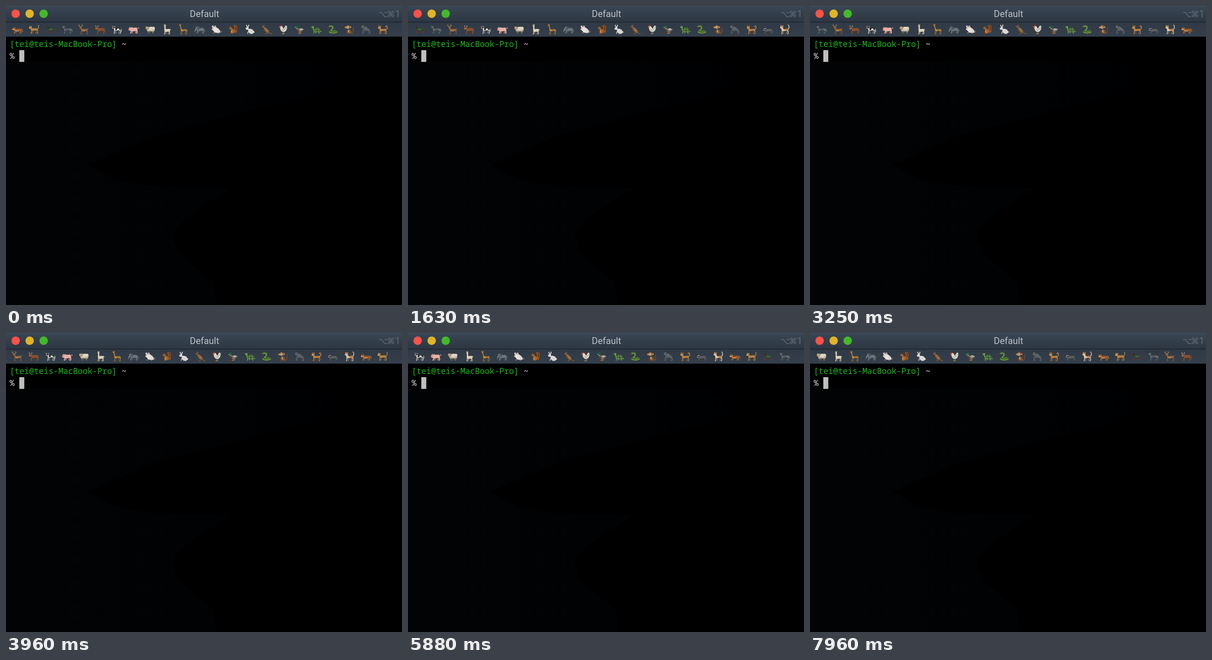
These frames come from a looping animation (862x650 px, 8000 ms). An HTML page:

```html
<!DOCTYPE html>
<html lang="en">
<head>
<meta charset="utf-8">
<title>Terminal</title>
<style>
html, body { margin: 0; width: 100%; height: 100%; overflow: hidden; background: #000; }
svg { display: block; width: 862px; height: 650px; }
.mono { font: 17.67px "Noto Sans Mono", "DejaVu Sans Mono", monospace; white-space: pre; }
.title { font: 20px Roboto, sans-serif; fill: #b9c0c8; text-anchor: middle; }
.key { font: 18px "DejaVu Sans", sans-serif; fill: #626c78; text-anchor: middle; }
#zoo { stroke-linecap: round; stroke-linejoin: round; }
</style>
</head>
<body>
<svg viewBox="0 0 862 650">
  <defs>
    <linearGradient id="head" x2="0" y2="1"><stop stop-color="#3a4654"/><stop offset="1" stop-color="#2d3742"/></linearGradient>
    <linearGradient id="bar" x2="0" y2="1"><stop stop-color="#303a46"/><stop offset="1" stop-color="#343f4b"/></linearGradient>
    <linearGradient id="dusk" x2="1" y2="0"><stop stop-color="#010304"/><stop offset=".6" stop-color="#000204"/><stop offset="1" stop-color="#000001"/></linearGradient>
  </defs>
  <rect width="862" height="650"/>
  <path fill="url(#dusk)" d="M0 120H770L690 192L600 210L330 280L180 345L240 378L330 392L490 396Q440 428 400 455Q368 478 362 505L380 540L450 600L460 650H0Z"/>
  <rect width="862" height="35" fill="url(#head)"/>
  <rect width="862" height="1" fill="#435164"/>
  <rect y="34" width="862" height="1.4" fill="#1f2730"/>
  <rect y="35.4" width="862" height="31.2" fill="url(#bar)"/>
  <circle cx="21" cy="16.7" r="9.2" fill="#ff5147"/>
  <circle cx="51.5" cy="16.7" r="9.2" fill="#e0b424"/>
  <circle cx="82" cy="16.7" r="9.2" fill="#43b929"/>
  <text class="title" x="432" y="24">Default</text>
  <text class="key" x="821" y="23.5">⌥</text>
  <text class="key" x="838" y="23.5">⌘</text>
  <text class="key" x="852.5" y="24" style="font:20px Roboto,sans-serif">1</text>
  <g id="zoo"></g>
  <text class="mono" x="8" y="89" fill="#14bd14">[tei@teis-MacBook-Pro] <tspan fill="#e2e2e2">~</tspan></text>
  <text class="mono" x="8" y="115" fill="#dcdcdc">%</text>
  <rect x="29" y="96" width="10.8" height="25.5" fill="#bfbfbf"/>
</svg>
<script>
const line = (d, c, w = 1) => `<path d="${d}" fill="none" stroke="${c}" stroke-width="${w}"/>`;
const shape = (d, c) => `<path d="${d}" fill="${c}"/>`;
const oval = (x, y, rx, ry, c) => `<ellipse cx="${x}" cy="${y}" rx="${rx}" ry="${ry}" fill="${c}"/>`;
const eye = (x, y) => oval(x, y, .5, .6, '#15110f');
const narrow = (art, k) => `<g transform="scale(${k} 1)">${art}</g>`;

// Four-legged body facing left; the options set its build.
function beast(c, o = {}) {
  const { far = c, x = -7.5, y = -2.5, r = 2.5, fat = 5.5, top = 0, w = 1.5, foot = 8.5, neck = 3,
          tail = 'M8 -1q3 0 3 5', tw = 1.2, ears = 1 } = o;
  const up = top - fat / 2, low = top + fat / 2;
  return line(tail, c, tw) +
    line(`M-3 ${low - 1}L-2.2 ${foot - .8}h-.8M5.5 ${low - 1}L4.6 ${foot - .8}h-.8`, far, w) +
    shape(`M-6 ${up}Q0 ${up + 1} 5.5 ${up}Q9.5 ${up + .6} 8.6 ${low}Q6 ${low} 4 ${low - 1}Q0 ${low + .4} -4 ${low}Q-7 ${low - 1} -6 ${up}Z`, c) +
    line(`M-5 ${low - 1.5}L-5.6 ${foot}h-.8M7.4 ${low - 1.5}L8.3 ${(low + foot) / 2}L7.4 ${foot}h-.8`, c, w) +
    line(`M-4.5 ${top - .5}L${x + 1} ${y}`, c, neck) +
    oval(x, y, r + .5, r, c) +
    (ears ? line(`M${x - .8} ${y - r}l-.4 -.8M${x + 2} ${y - r + .3}l.7 -.9`, c, 1.3) : '') +
    eye(x - 1, y - .4);
}

const tiger = beast('#d0752f', { far: '#95491c', y: -1, top: 1, foot: 8, tail: 'M8 -1q3 0 3 3t1 2' }) +
  line('M-3 3.5H3', '#e6cba6', 1) + line('M-3 -1l.5 2.5M0 -1l.4 3M3 -1l.3 2.5M6 -1.5l.6 4M-8 -3.4v1', '#2c1a12', .9) +
  oval(-9.2, 0, 1.4, 1, '#eedcc2');

const leopard = beast('#cf9648', { far: '#8d6430', y: -4, tail: 'M8 -1q3 -2 2 -5t1 -3' }) +
  line('M-4 -1h.1M-2 1h.1M0 -1h.1M2 .8h.1M4 -1.2h.1M6 1h.1M7 -1h.1M-6 -3h.1M7.5 4h.1M-5 4h.1', '#4c2d16', 1.3) +
  oval(-9.2, -3, 1.3, .9, '#eed8b0');

const horse = beast('#4d3928', { far: '#33261d', x: -8, y: -4.5, r: 1.7, fat: 4.8, w: 1.1, neck: 2.6, foot: 8, tail: 'M8 -2q4 0 3 6', tw: 1.6 }) +
  line('M-4.5 -2.5L-6.5 -6', '#211b18', 1.2) + shape('M-3 -2H5L5.5 1.8H-3Z', '#256b39') +
  line('M-5.6 5v1.6M-2.4 5v1.4M4.8 5v1.4M7.8 5.6l-.2 1', '#a3302d', 1.2);

const zebra = beast('#85888a', { far: '#505457', x: -8, y: -4.5, r: 1.7, fat: 4.8, w: 1.1, neck: 2.6, foot: 8 }) +
  line('M-6.5 -4.5l1 3M-4 -2l.8 4M-1.5 -1.6l.4 3.6M1 -1.6v3.4M3.5 -2l-.4 4M6.3 -2l-.4 4M-6 5h1M7 5h1.4', '#25282c', 1.1) +
  oval(-9.6, -3.8, 1, .9, '#37393b');

const deer = beast('#9b6636', { far: '#684022', x: -7.2, y: -4, r: 1.9, fat: 4.8, top: 1, w: 1.1, foot: 10, neck: 2.6, tail: 'M8 -1l2 -1' }) +
  line('M-7 -6q-4 -1 -3 -5M-9.5 -8l-2 -.5M-6 -6q4 0 2 -5M-3.8 -8l2 -1', '#c2955f', .9) + oval(0, 3, 4, .7, '#c99e6c');

const ox = beast('#88502d', { far: '#5a321b', x: -7.5, y: -3, r: 2.7, fat: 7, w: 1.8, neck: 4.5, tail: 'M9 -2q2 2 1 7' }) +
  line('M-9 -5.5q-2 -1 -1 -3M-5.5 -5.5q2 -1 1 -3', '#dccaaa', 1) + oval(-9, -1.6, 1.6, 1.2, '#bd8e6e');

const cow = beast('#e3e1d9', { far: '#98948d', x: -7, y: -4, r: 2.1, fat: 5.2, w: 1.3, tail: 'M9 -2q2 2 1 7', tw: .9 }) +
  shape('M-3 -2.3H1L0 1Q-2 3 -4 0ZM4 -2.8H8.5V1Q6 2.5 4 -2.5ZM-9 -6L-5 -6V-2.4L-7.6 -2.4Z', '#282522') +
  oval(-8.6, -2.8, 1.3, 1, '#d9a59b') + line('M-5 -6l1.4 -1.6M-9 -6l-2 -1.6', '#8d8478', .9);

const pig = beast('#eab0a5', { far: '#bd7d74', x: -6.8, y: -.5, r: 3.4, fat: 8.5, w: 2, foot: 8, tail: 'M9 -2q3 1 1 -2q-2 1 2 1', tw: .9 }) +
  oval(-9.6, .6, 1.3, 1.6, '#d68c85') + line('M-7 -4l-1 -1M-4 -3.6l1.4 -1', '#d28b83', 1.2);

const sheep = line('M-4 4v4.5M-1 4v4M5 4v4M7 4v4.5', '#857357', 1.4) +
  [-4, -1, 2, 5, 7].map((x, i) => oval(x, i % 2 - 2, 3.5, 4, '#ded5c2') + oval(x, 1.6, 3, 3, '#bdb19a')).join('') +
  oval(2, -2, 6.5, 3.8, '#ded5c2') + oval(-7.3, -3.5, 2.6, 3, '#c3aa87') +
  line('M-6 -6q4 0 3 3t-3 1', '#83694c', 1.3) + eye(-8.2, -4);

const llama = narrow(beast('#ddd0b5', { far: '#a18e6f', x: -5.5, y: -8, r: 1.8, fat: 7, top: 2, w: 1.7, foot: 10, neck: 3.6, tail: 'M8 0l2 1', tw: 2 }) +
  line('M-5 -9l-.5 -1.6M-4 -9l.6 -1.6', '#c9b089', 1.1) + oval(-7.4, -7.3, 1.2, .8, '#9f815d'), .8);

const giraffe = narrow(beast('#c98f3c', { far: '#885822', x: -8.5, y: -9, r: 1.4, fat: 4.5, top: 1.5, w: 1.2, foot: 10.5, neck: 2.4, tail: 'M8 0q2 2 1 5', tw: .9 }) +
  line('M-6.5 -7h.1M-5.5 -4h.1M-4 -1h.1M0 1h.1M2 2h.1M4 .5h.1M6.5 2h.1M7.6 5h.1M-5 5h.1', '#66391a', 1.6), .88);

const elephant = beast('#6c757d', { far: '#454d55', x: -5.5, y: -3, r: 3.2, fat: 7.5, w: 2.3, foot: 7.6, ears: 0 }) +
  line('M-8 -3q-2 2 -2 4.5t-1.5 3.5', '#6c757d', 1.7) + oval(-3, -2.5, 2.2, 3.4, '#4e5760') + line('M-7.8 .6l-2 .6', '#e0d9c9', .9);

const mouse = line('M6 6q5 1 4.6 -1.6t-3.6 -1', '#c98d86', 1) +
  shape('M-8 -4Q-3 -8 2 -3Q8 0 8 6.6Q4 8.4 -4 6.6Q-6 4 -8 1.6Q-12.5 .5 -8 -4Z', '#e6e2dc') +
  line('M2 0Q6 3 3 6.4', '#b9b3ac', .8) +
  oval(-8, -6, 2, 2.4, '#eee9e3') + oval(-8, -5.8, 1.1, 1.5, '#d7958f') + oval(-3, -6, 2.2, 2.6, '#ddd6cf') +
  oval(-3, -5.8, 1.3, 1.7, '#d7958f') + line('M-5 7.6h-2M2 8h2.6', '#d3978f', 1.2) + eye(-7.8, -1.6) + oval(-10.2, .3, .7, .6, '#cf706d');

const squirrel = shape('M4 8Q10 8 8.6 1Q11.6 -9 5 -10Q0 -10 2 -5.6Q4 -3 2 3Z', '#94501d') +
  line('M5 -8Q8.5 -5 6 1', '#532911', 1.4) + shape('M-4 -2Q3 -2 3.4 4Q4.4 9 -4.6 9Q-5.4 4 -4 -2Z', '#a8652d') +
  oval(-5.5, -3, 3.1, 2.7, '#a8652d') + line('M-6 -5.6v-1.4M-3.6 -5l.8 -1.4', '#6c3816', 1.3) + oval(-3.4, 4, 1.1, 2.8, '#d9b788') +
  line('M-4 3l-3 .8M-5 9h-1.6', '#723c18', 1.3) + eye(-6.5, -3.4);

const rabbit = shape('M-4 -1Q4 -3 8 2Q10 6 7 9Q1 9 -2 7Z', '#dedbd6') + oval(9, 5.6, 1.5, 1.6, '#f5f3f0') +
  oval(-5.5, -2, 3.2, 2.6, '#e8e5e0') + line('M-5 -4.6L-7 -9M-3.6 -4.4L-2 -9.4', '#e6e3de', 2) +
  line('M-5.4 -5.6L-6.8 -8.6M-3.4 -5.4L-2.2 -8.8', '#cf9792', .8) + line('M-3 4l-1.6 4.6M1 9h5', '#c9c5c0', 1.7) +
  line('M2 6Q3 3 6 4', '#b3afaa', .8) + eye(-6.5, -2.4);

const kangaroo = line('M4 5Q7 9 11 9', '#845831', 1.8) + shape('M-6 -5Q0 -5 5.4 3Q7 7 2 7.4Q-4 3 -6 -5Z', '#9d6d3c') +
  line('M3 5l-3 2l1 2.5h-3.5M-2 0l-3.6 1.8', '#794f29', 1.5) + oval(-7, -6, 2.4, 1.7, '#9d6d3c') +
  line('M-6.2 -7.5l.2 -2.4M-5.2 -7l1.8 -2.2', '#845831', 1.3) + eye(-7.6, -6.4);

const rooster = narrow(shape('M2 -1Q5 -9 8 -8.6Q11 -7 9 -1Q8 4 3 5.4Q-4 6 -6.4 -2Q-7 -8 -4 -8.4Q-1 -7 2 -1Z', '#dcd7cb') +
  line('M5 0Q7 -6 9 -5M-2 0q3 4 6 0', '#98938a', 1.1) + line('M0 6v3.6h-1.6M3 6v3.6h-1.6', '#c98f37', 1.1) +
  shape('M-7.4 -7L-7.6 -9.6L-6 -8.6L-5 -10.6L-4 -8.6L-2.4 -9.6L-3 -7Z', '#c92b2b') + line('M-6.6 -4v2', '#c92b2b', 1.8) +
  shape('M-7 -6.6L-9.6 -5.2L-6.6 -4.6Z', '#dba83b') + eye(-5.4, -6.4), .95);

const duck = shape('M-5 -1Q2 -3 10.5 -3.4Q8 5 1 5Q-5 5 -6 1Z', '#7a7167') + shape('M-6 -1Q-2 -1 -1.4 4Q-5 4.6 -6 -1Z', '#5f3224') +
  shape('M-.5 -1Q5 -3 9 -1Q5 3 0 1Z', '#b9b2a7') + line('M6.6 -2.2l3.6 -1', '#212326', 1.6) + oval(-5.5, -5.2, 2.7, 3, '#166c40') +
  line('M-6.8 -1.8h3', '#e6e3db', 1) + shape('M-7.6 -6L-11 -4.4L-7.8 -3.4Z', '#d39d2e') + line('M0 5v3.4h-2.6M3 5v3.4H1', '#d67b2a', 1.2) + eye(-6.2, -5.9);

const turtle = line('M-4 5l-1 3.4M6 5l.8 3.4M-.4 5v2.6M10 4l1 1', '#5a9342', 2.1) + line('M-4.6 2.6L-6.8 -4', '#619d46', 2.4) +
  oval(-7.3, -5.3, 2.8, 2.3, '#67a34a') + shape('M-4.6 4Q-3.6 -4.4 3 -4.6Q9 -3.6 10 4.6Q2 6.4 -4.6 4Z', '#365c2d') +
  line('M0 -3.6L-1 3M5 -3.8L6 5M-3.6 0Q3 -1 9 1', '#7f9f46', .8) + line('M-4.6 4Q3 6.6 10 4.8', '#9ca456', 1) + eye(-8.2, -5.8);

const snake = oval(1, 5.4, 9.6, 3.6, '#44742b') + oval(1, 4.6, 6.4, 1.8, '#1e2b1b') +
  line('M-6 -7Q1 -9 1 -4Q0 0 -3 1.6Q-6 4 1 4.6Q5 4.6 6 2.6', '#4f8531', 2.5) +
  line('M-2.6 -7Q.8 -6 -.4 -3Q-2 0 -4 2M-7.6 5.6Q0 10 9 5.6', '#b8c552', .9) + oval(-5.6, -7, 3, 1.8, '#619539') +
  line('M-8.4 -6l-2 1', '#c43833', .8) + eye(-6.6, -7.5);

const monkey = line('M3 7Q10 9 9 3Q7 -1 9.6 -4', '#7e4c27', 1.4) + shape('M-3 0Q4 0 5 5Q5 9 0 9Q-4 8 -3 0Z', '#8a5a2d') + oval(-1.6, 4, 1.6, 3, '#c59869') +
  line('M-3 2L-6 4.6L-4.4 7M2 2L3 6M-2 9.4h-3M4 9.4h2.6', '#7c4628', 1.5) + oval(-8, -4.6, 1.7, 1.9, '#c99468') + oval(2.6, -5, 1.7, 1.9, '#c99468') +
  oval(-2.6, -5.4, 4.4, 4.4, '#87532b') + oval(-3.3, -4.4, 3.2, 3, '#d8ad80') + eye(-4.6, -5.2) + eye(-1.8, -5.2) + line('M-4.6 -2.8q1.4 .8 2.8 0', '#80503a', .7);

const gorilla = line('M4 1L6 4.6L5 8.6h-1.6M-2 0L-1.6 7.6h-1.4', '#3b4147', 2.3) +
  shape('M-6 -6Q0 -8 4 -3Q9 -1 9 4L7.6 5Q4 3 1 2.6Q-3 4 -6 1Z', '#585f65') +
  line('M-4 0L-6.4 4L-6 8.4h-1.4M7.6 3L9 6L8 8.8h-1.4', '#585f65', 2.3) + line('M-2 -4Q1 -4 3 -1', '#7b8288', 1) +
  oval(-6.4, -6, 3.2, 3.6, '#4c5359') + oval(-7.2, -5.2, 2.1, 2.3, '#7f8487') + eye(-8, -6) + eye(-6.4, -6) + line('M-8.2 -4h2', '#292d31', .7);

const dog = beast('#bf8042', { far: '#87552a', x: -6.5, y: -4.5, r: 2.6, fat: 5, top: 1, w: 1.5, foot: 9.5, neck: 3.8, tail: 'M7 0q5 -2 3 -7q-2 -2 -3 1', tw: 1.8 }) +
  shape('M-8.8 -6.4L-8.6 -10.4L-6.5 -7.4ZM-5.5 -7L-3.2 -10L-3.6 -5.5Z', '#a16431') + oval(-8.4, -3.2, 1.6, 1.2, '#e6c798') + oval(-9.6, -3.8, .7, .6, '#241b17');

const raccoon = line('M6 2Q10.6 1.4 10.6 5', '#56585a', 2.7) + line('M8.4 1.4l-.4 2.4M10.8 3.4l-2 .8', '#202327', 1.1) +
  beast('#5c5e5f', { far: '#36393c', x: -6.5, y: 0, r: 2.6, fat: 6, top: 1.6, w: 1.6, foot: 8, tail: 'M8 2h1' }) +
  line('M-8.6 -1.4q2 -1 4.4 0', '#c9c6bf', .9) + line('M-8.6 0h4.4', '#1d2124', 1.4) + oval(-8.4, 1.4, 1.4, .8, '#c9c5bb');

const cat = beast('#dfc5a6', { far: '#9d7853', x: -6, y: -5, r: 2.8, fat: 5, top: 1, w: 1.5, foot: 9.5, neck: 3.8, tail: 'M7 0q3 -2 3 -5t-2 -5', tw: 1.6 }) +
  shape('M-8.6 -6.6L-8.8 -10.6L-6 -7.6ZM-5 -7.6L-2.8 -10.4L-3 -5.5Z', '#bb7239') + shape('M-2 -1Q2 -1.6 8 -1.6L8.6 2Q4 1 1 1.6Z', '#c8823f') +
  oval(-4.4, -5.6, 1.6, 1.9, '#c8823f') + oval(-7.4, -3.8, 1.9, 1.3, '#f0e4d4') + line('M1 -.8l.4 1.8M4 -1l.3 1.8M6.6 -1l.4 2', '#87491f', .8) + eye(-7.3, -5.6);

const zoo = [tiger, leopard, horse, zebra, deer, ox, cow, pig, sheep, llama, giraffe, elephant, mouse, squirrel,
  rabbit, kangaroo, rooster, duck, turtle, snake, monkey, gorilla, dog, raccoon, cat];
const SHOWN = 23, PITCH = 36.13, LOOP = 8000, TICK = 1000, LEAD = 740;

const row = document.getElementById('zoo');
row.innerHTML = zoo.map(a => `<g>${a}</g>`).join('');
const cells = [...row.children];

function draw(t) {
  const step = Math.floor((t % LOOP + LEAD) / TICK);
  cells.forEach((cell, i) => {
    const slot = (i - step + zoo.length) % zoo.length;
    cell.setAttribute('display', slot < SHOWN ? 'inline' : 'none');
    cell.setAttribute('transform', `translate(${24.6 + slot * PITCH} 51)`);
  });
}

const start = performance.now();
function tick() {
  draw(performance.now() - start);
  requestAnimationFrame(tick);
}
tick();
</script>
</body>
</html>
```
